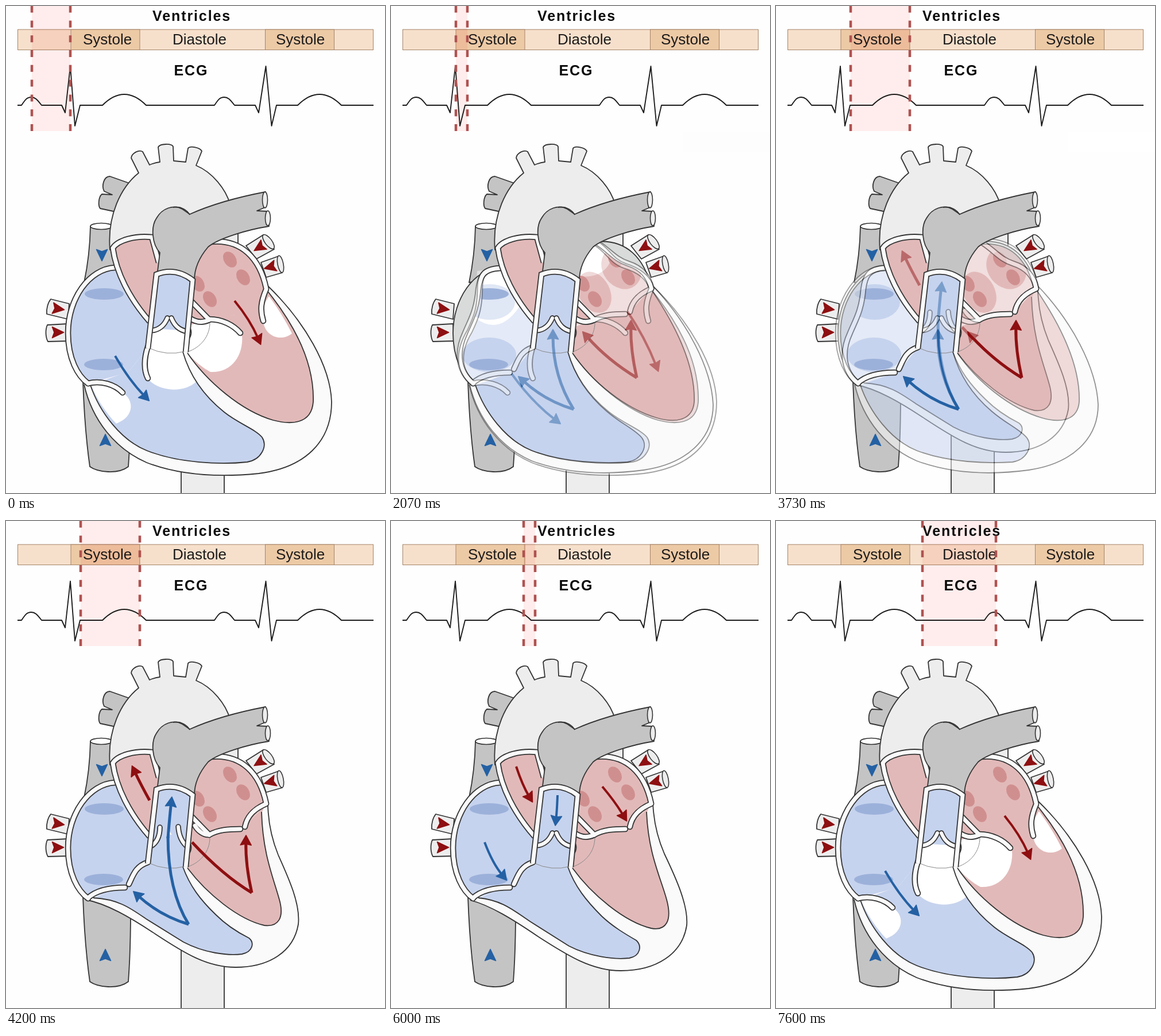
Animation of 660 by 849 pixels, one loop 8.33 s. Source, as an HTML page:

```html
<!DOCTYPE html>
<html lang="en">
<head>
<meta charset="utf-8">
<title>Cardiac cycle</title>
<style>
  html, body { margin: 0; height: 100%; overflow: hidden; background: #fefefe; }
  svg { display: block; width: 100vw; height: 100vh; }
  text { font: 26px "Liberation Sans", Arial, sans-serif; fill: #1c1a1a; }
  .title { font-size: 25px; font-weight: bold; letter-spacing: 1.9px; fill: #0b0b0b; }
  .span rect { fill: #ffeeed; mix-blend-mode: multiply; }
</style>
</head>
<body>
<svg id="stage" viewBox="0 0 660 849"></svg>
<script>
const INK = '#343434', WALL = '#fafafa', GREY = '#c4c4c4', PALE = '#ededed', OUTSIDE = '#d9dbdb';
const BLUE = '#c6d3ee', RED = '#e2b9b9', DEEP_BLUE = '#2461a4', DEEP_RED = '#8e0f11';

const path = (d, fill = 'none', stroke = INK, width = 1.8) =>
  `<path d="${d}" fill="${fill}" stroke="${stroke}" stroke-width="${width}" stroke-linejoin="round"/>`;
const area = (d, fill) => path(d, fill, 'none');
const ellipse = (x, y, rx, ry, fill, turn = 0, stroke = 'none') =>
  `<ellipse rx="${rx}" ry="${ry}" fill="${fill}" stroke="${stroke}" stroke-width="1.6" transform="translate(${x} ${y}) rotate(${turn})"/>`;

// Outlined white bands that merge where they meet.
const tubes = (list, width = 10.5, cap = 'round') => [[INK, width], [WALL, width - 3.6]].map(([color, w]) =>
  `<g fill="none" stroke="${color}" stroke-width="${w}" stroke-linecap="${cap}">` +
  list.map(d => `<path d="${d}"/>`).join('') + '</g>').join('');

const placed = (d, x, y, turn, color) =>
  `<g transform="translate(${x} ${y}) rotate(${turn})">${path(d, color, color, 1.6)}</g>`;
const marker = (x, y, turn, color) => placed('M10.500 0L-9.500 9.500L-6 0L-9.500 -9.500Z', x, y, turn, color);

function arrow(color, x0, y0, cx, cy, x1, y1, width = 4) {
  const angle = Math.atan2(y1 - cy, x1 - cx);
  const endX = x1 - 13 * Math.cos(angle), endY = y1 - 13 * Math.sin(angle);
  return path(`M${x0} ${y0}Q${cx} ${cy} ${endX} ${endY}`, 'none', color, width) +
    placed('M-1 0L-18 9.500L-16 0L-18 -9.500Z', x1, y1, angle * 180 / Math.PI, color);
}

// Chamber walls
const ATRIA = {
  full: {
    ra: 'M190 456C145 458 108 510 108 570C108 615 125 645 143 658',
    la: 'M357 411C410 406 442 440 453 492'
  },
  tight: {
    ra: 'M190 457C162 459 156 468 155 488C155 530 147 546 137 567C117 600 115 634 143 658',
    la: 'M359 415C378 427 384 445 407 453C433 461 448 473 454 492'
  },
  relaxing: {
    ra: 'M190 457C160 458 155 472 152 494C149 532 138 548 129 570C114 602 116 636 143 658',
    la: 'M361 414C382 428 391 442 413 449C438 457 450 474 453 492'
  }
};
const closeRA = d => d + 'L212 639L246 597L258 470Z';
const closeLA = d => d + 'L414 535L356 547L318 560L322 470L340 430Z';

const VENTRICLES = {
  large: {
    outer: 'M136 660C150 722 190 772 245 796C310 821 380 821 440 815C520 805 567 760 567 690C565 628 520 550 456 488',
    rv: 'M147 661C163 708 200 757 245 775C300 797 375 800 420 795C444 791 456 768 446 752C435 738 405 728 380 708C345 680 320 645 308 603',
    lv: 'M453 494C505 558 537 625 535 690C532 730 495 730 465 722C410 706 350 655 316 605'
  },
  squeezed: {
    outer: 'M137 660C152 722 192 770 245 793C310 817 380 817 440 809C515 798 561 755 561 695C558 630 515 550 456 488',
    rv: 'M147 661C163 708 200 757 245 775C300 796 370 798 412 795C436 791 448 768 437 753C425 738 400 728 375 706C342 678 320 645 308 603',
    lv: 'M453 494C498 560 530 628 528 690C525 726 490 726 463 718C408 702 350 655 316 605'
  },
  small: {
    outer: 'M138 660C175 667 215 690 260 720C310 753 350 778 400 778C458 778 501 751 509 703C513 668 492 622 474 582C461 550 456 520 456 490',
    rv: 'M152 657C195 659 217 675 243 693L309 734C345 753 385 758 411 755C430 751 433 735 423 727C405 718 383 704 365 686C338 660 320 636 308 603',
    lv: 'M445 507C447 580 465 620 476 660C485 692 474 708 450 705C405 695 350 650 316 605'
  },
  easing: {
    outer: 'M138 661C173 670 213 695 257 725C308 758 350 784 400 784C462 784 507 755 515 705C518 670 496 622 476 580C463 550 457 520 456 490',
    rv: 'M152 657C195 661 216 681 242 698L310 741C345 759 388 765 415 762C435 758 437 740 427 731C408 720 386 707 367 689C340 662 320 637 308 603',
    lv: 'M445 507C448 580 469 620 480 660C490 697 479 715 453 710C407 699 350 652 316 605'
  }
};

const AV_OPEN = [
  'M143 658C165 652 190 660 203 674', 'M247 594C240 615 240 635 247 649',
  'M354 546C376 546 396 556 408 570', 'M453 494C444 515 442 530 448 549'
];
const AV_CLOSED = [
  'M143 657C155 646 175 639 207 639', 'M247 595C226 602 222 616 214 633',
  'M354 547C370 538 388 537 408 537', 'M453 493C432 502 420 514 416 533'
];
const AORTIC_ROOT = 'M320 512L354 547';
const CUSPS = {
  shut: ['M252 566C268 565 276 556 281 544', 'M317 568C300 565 293 556 288 544'],
  open: ['M252 567C262 562 268 550 268 534', 'M317 569C307 561 301 549 300 533']
};

const states = [
  {
    atria: 'full', ventricles: 'large',
    unfilled: ['M250 562L242 610L246 648C262 672 310 676 331 655Q316 632 309 603L316 566Z',
      'M318 556L354 550C380 550 400 562 411 574C414 610 392 640 356 638Q335 627 316 605Z',
      'M448 550C450 572 475 588 498 571Q480 535 458 506Q444 525 448 550Z',
      'M148 661C180 655 195 665 203 674C222 685 226 715 192 728Q165 700 148 661Z'],
    arrows: arrow(DEEP_BLUE, 190, 610, 214, 652, 250, 689) + arrow(DEEP_RED, 398, 514, 425, 547, 444, 591)
  },
  {
    atria: 'tight', ventricles: 'large',
    emptied: ['M190 457L150 462L146 543Q188 576 223 525L258 470Z',
      'M335 440L357 411L383 437C382 462 352 477 326 470Z'],
    arrows: arrow(DEEP_BLUE, 210, 641, 245, 690, 296, 729) + arrow(DEEP_RED, 412, 533, 442, 577, 466, 638)
  },
  {
    atria: 'relaxing', ventricles: 'squeezed', closed: true, pooling: true,
    arrows: arrow(DEEP_RED, 428, 648, 378, 618, 333, 567, 5) + arrow(DEEP_RED, 428, 648, 417, 600, 418, 547, 5) +
      arrow(DEEP_BLUE, 318, 703, 282, 645, 282, 563, 5) + arrow(DEEP_BLUE, 318, 703, 268, 688, 221, 645, 5)
  },
  {
    atria: 'full', ventricles: 'small', closed: true, ejecting: true,
    arrows: path('M428 648Q378 618 324 560', 'none', DEEP_RED, 5) + arrow(DEEP_RED, 428, 648, 417, 600, 418, 547, 5) +
      arrow(DEEP_RED, 250, 487, 235, 460, 219, 426, 5) +
      path('M318 703Q282 645 282 550', 'none', DEEP_BLUE, 5) + arrow(DEEP_BLUE, 282, 553, 285, 515, 289, 480, 5) +
      arrow(DEEP_BLUE, 318, 703, 268, 688, 221, 645, 5)
  },
  {
    atria: 'full', ventricles: 'easing', closed: true,
    arrows: arrow(DEEP_RED, 218, 428, 229, 461, 247, 491) + arrow(DEEP_BLUE, 290, 478, 289, 505, 286, 532) +
      arrow(DEEP_BLUE, 163, 560, 177, 597, 202, 627) + arrow(DEEP_RED, 368, 463, 390, 489, 411, 524)
  }
];

const vessels =
  path('M147 384Q146 435 136 482L215 470L184 384Z', GREY) + ellipse(166, 384, 19, 5.5, '#fff', 0, INK) +
  path('M134 655Q137 740 146 803C160 813 195 817 213 803Q217 750 217 680Z', GREY) +
  path('M305 730H380V856H305Z', PALE) +
  path('M215 309L181 297C170 297 166 314 171 323L185 329L167 328C161 333 160 348 164 353L192 359Z', GREY) +
  path('M110 519L78 511C73 517 70 528 71 537L108 546Z', PALE) +
  path('M108 554L72 556C68 565 69 578 73 585L110 584Z', PALE) +
  path('M418 418L448 399L467 424L436 441Z', PALE) + ellipse(457, 411, 6, 15, PALE, -37, INK) +
  path('M444 447L475 436L481 465L453 473Z', PALE) + ellipse(478, 450, 5, 15, PALE, -11, INK);

const arch = path('M181 425C176 365 200 316 231 291L218 265C219 256 232 250 238 254L250 277Q259 273 268 272' +
  'L265 246C268 240 288 239 291 245L292 270L313 272L317 248C321 243 338 247 341 253L331 278' +
  'C360 290 383 320 390 345L404 380V425L330 470Z', PALE);

const aorta = area('M186 422C195 408 225 400 254 403L268 440L258 500L250 548C215 510 192 465 186 422Z', RED) +
  tubes(['M266 447L254 403C225 400 195 408 186 422C192 465 215 510 250 550'], 10.5, 'butt');

const trunk = path('M263 470L268 430C254 415 252 385 262 370C272 352 292 346 307 354L320 363C360 345 410 332 452 324' +
  'L449 352L437 357L456 358L458 384C420 390 370 405 352 420C335 440 328 460 328 478Z', GREY) +
  path('M291 351C305 348 316 357 320 364') +
  ellipse(451, 338, 4.5, 14, PALE, 0, INK) + ellipse(456, 370, 4.5, 13, PALE, 0, INK);

const flowMarkers = marker(167, 434, 90, DEEP_BLUE) + marker(173, 757, -90, DEEP_BLUE) +
  marker(91, 528, 8, DEEP_RED) + marker(90, 569, 0, DEEP_RED) +
  marker(441, 421, 148, DEEP_RED) + marker(460, 455, 165, DEEP_RED);

const inlets = [[171, 502], [170, 625]].map(([x, y]) => ellipse(x, y, 34, 10, '#9cb1da')).join('') +
  [[390, 442], [413, 473], [355, 511], [334, 484]].map(([x, y]) => ellipse(x, y, 10.5, 15, '#d08f8f', -33)).join('');

function heart(s) {
  const { ra, la } = ATRIA[s.atria], v = VENTRICLES[s.ventricles], full = ATRIA.full;
  const whites = list => (list || []).map(d => area(d, '#fff')).join('');
  const outside = (whole, inner) =>
    `<path d="${whole + inner}" fill="${OUTSIDE}" fill-rule="evenodd"/>`;
  let out = `<path d="M0 219H660V849H0Z" fill="#fefefe"/>` + vessels + arch + path(v.outer, WALL);

  out += area(v.rv, BLUE) + area(v.lv, RED) +
    area('M147 661L212 639L246 597L250 545L318 548L308 605Z', BLUE) +
    area('M356 546L414 535L452 494L446 507V520L316 606L318 552Z', RED) +
    area(closeRA(full.ra), s.pooling ? '#fff' : BLUE) + area(closeLA(full.la), s.pooling ? '#fff' : RED);
  if (s.pooling) {
    out += ellipse(172, 516, 44, 31, BLUE) + ellipse(171, 608, 47, 30, BLUE) +
      ellipse(401, 457, 32, 39, RED, -38) + ellipse(354, 499, 27, 38, RED, -28);
  }
  out += whites(s.unfilled) + whites(s.emptied) + inlets + area('M318 505L354 546L318 556Z', RED);
  if (s.atria !== 'full') {
    out += outside(closeRA(full.ra), closeRA(ra)) + outside(closeLA(full.la), closeLA(la)) +
      path(full.ra) + path(full.la);
  }
  out += path(v.rv) + path(v.lv) +
    path('M355 552C355 575 340 595 316 603', 'none', '#888', 1) +
    path('M248 596Q280 611 312 602', 'none', '#888', 1);

  const aorticCusp = s.ejecting ? 'M354 547C344 548 334 540 329 531' : 'M354 547C342 553 330 551 320 544';
  out += tubes([ra, la, AORTIC_ROOT, aorticCusp, ...(s.closed ? AV_CLOSED : AV_OPEN)]) +
    path('M318 556Q327 570 318 581') + aorta + trunk;

  out += area('M262 468Q295 455 325 478L316 568C300 564 294 555 285 541C277 555 270 564 252 566Z', BLUE) +
    tubes(CUSPS[s.ejecting ? 'open' : 'shut'], 9.5) +
    tubes(['M247 597L262 468Q295 455 325 478L313 603'], 10.5, 'butt');
  return out + flowMarkers + s.arrows;
}

const bar = (x, w, fill) => `<rect x="${x}" y="41" width="${w}" height="35.5" fill="${fill}" stroke="#a58468"/>`;
const label = (x, y, word, kind = '') => `<text x="${x}" y="${y}" class="${kind}">${word}</text>`;
const pWave = 'c6 -9 9 -14 17 -14s12 7 18 14';
const tWave = 'c12 -12 24 -19 38 -19s26 7 38 19';
const chart = bar(20.5, 619, '#f6e0cc') + bar(113, 120, '#edcaa6') + bar(451.5, 120, '#edcaa6') +
  label(255, 26, 'Ventricles', 'title') + label(292.5, 121, 'ECG', 'title') +
  label(134, 67, 'Systole') + label(290, 67, 'Diastole') + label(470, 67, 'Systole') +
  path(`M20 173H27${pWave}H97L103 186L112 105L120 209L129 173H168${tWave}` +
    `H363${pWave}H434L440 186L452.500 105L462.500 209L471 173H508${tWave}H640`, 'none', '#1d1d1d', 1.9);

const spans = [[45, 112], [113, 133], [130, 233], [231, 251], [255, 383]];
const spanMarkup = ([a, b]) => `<g class="span"><rect x="${a}" width="${b - a}" height="218"/>` +
  `<path d="M${a} -.4V218M${b} -.4V218" stroke="#b05250" stroke-width="4.5" stroke-dasharray="12 13.8"/></g>`;

const stage = document.getElementById('stage');
stage.innerHTML = chart + spans.map(spanMarkup).join('') +
  [...states, states[0]].map(s => `<g class="heart">${heart(s)}</g>`).join('');
const hearts = stage.querySelectorAll('.heart');
const spanGroups = stage.querySelectorAll('.span');

const LOOP = 8330, FADE_STEPS = 13, STEP = 200 / 3;
const fadeStarts = [70, 1670, 3400, 5130, 6800];

function render(now) {
  const t = now % LOOP;
  const phase = Math.max(0, fadeStarts.filter(start => start <= t).length - 1);
  const elapsed = t - fadeStarts[phase];
  const mix = elapsed < 0 ? 0 : Math.min(1, (Math.floor((elapsed + 5) / STEP) + 1) / FADE_STEPS);
  hearts.forEach((group, i) => {
    const opacity = i === phase ? 1 : i === phase + 1 ? mix : 0;
    group.style.display = opacity ? '' : 'none';
    group.style.opacity = opacity;
  });
  spanGroups.forEach((group, i) => group.style.display = i === phase ? '' : 'none');
}

const origin = performance.now();
function tick() {
  render(performance.now() - origin);
  requestAnimationFrame(tick);
}
tick();
</script>
</body>
</html>
```
